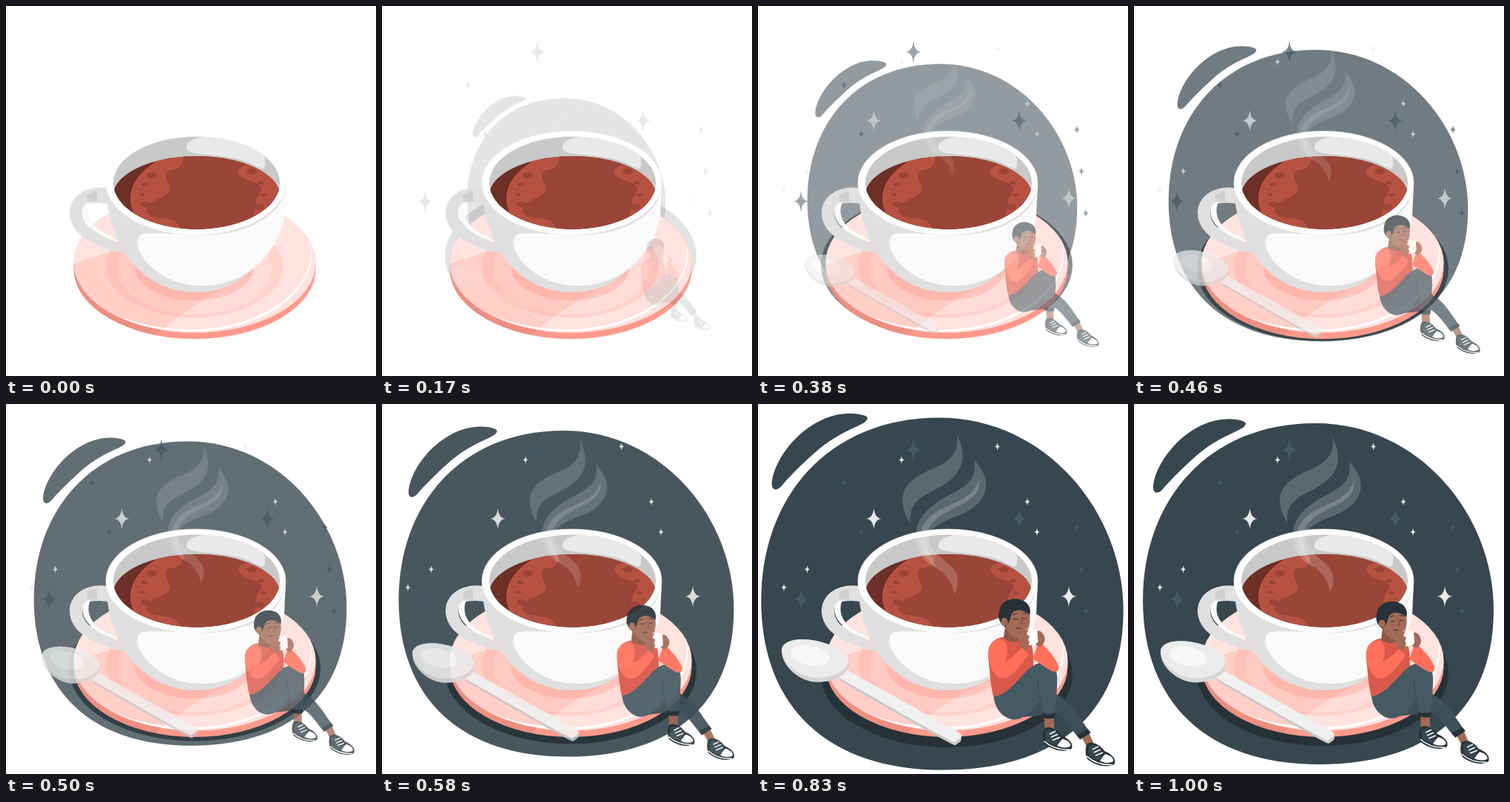
Write an HTML page that moves like this. It is 500 px wide and 500 px high and loops after 1.04 s.

```html
<!DOCTYPE html>
<html lang="en">
<head>
<meta charset="utf-8">
<title>Coffee break</title>
<style>
html, body { margin: 0; height: 100%; overflow: hidden; background: #fff; }
svg { display: block; width: 100%; height: 100%; }
</style>
</head>
<body>
<svg viewBox="0 0 500 500">
  <defs>
    <clipPath id="wedge"><path d="M80 352 148 330 250 340 335 362Q265 392 212 436L200 446V460H80Z"/></clipPath>
    <clipPath id="mouth"><ellipse cx="257.5" cy="239" rx="112.5" ry="62.5"/></clipPath>
    <clipPath id="coffee"><ellipse cx="257.5" cy="257" rx="113" ry="54"/></clipPath>
    <path id="star" d="M0-1Q.08-.08 .7 0 .08 .08 0 1-.08 .08-.7 0-.08-.08 0-1Z"/>
    <g id="shoe">
      <path fill="#263238" d="M387 437C394 432 404 438 410 446 420 450 426 457 423 463 414 469 398 465 388 457 384 450 385 442 387 437Z"/>
      <path fill="#37474f" d="M389 440C396 436 403 440 408 448L404 459Q394 457 389 452Z"/>
      <path fill="#fff" d="M411 450C419 452 423 457 421 460 414 463 408 461 404 459Q407 454 411 450Z"/>
      <path fill="none" stroke="#fff" stroke-width="1.5" d="M394 444l8-4M396 448l9-4M398 452l10-4M387 453Q400 465 420 464"/>
    </g>
  </defs>

  <g data-zoom="249 253" fill="#37474f">
    <path d="M245 26C385 26 486 150 486 278 486 420 390 487 250 487 100 487 12 405 12 265 12 130 100 26 245 26Z"/>
    <path d="M150 29C147 36 114 43 83 71 63 89 48 104 38 116 31 123 25 120 26 110 29 85 52 50 85 32 108 19 132 18 147 23Q153 25 150 29Z"/>
  </g>
  <g id="stars"></g>
  <ellipse id="shadow" cx="255" cy="364" rx="170" ry="98" fill="#263238"/>

  <!-- saucer -->
  <path fill="#ff9a8c" d="M91.5 347A163.5 94.5 0 0 1 418.5 347V355.5A163.5 94.5 0 0 1 91.5 355.5Z"/>
  <path clip-path="url(#wedge)" opacity=".07" d="M91.5 347H418.5V355.5A163.5 94.5 0 0 1 91.5 355.5Z"/>
  <ellipse cx="255" cy="347" rx="163.5" ry="94.5" fill="#ffe3df"/>
  <ellipse cx="254.5" cy="352" rx="119.5" ry="69" fill="#ffd2cc"/>
  <ellipse cx="254.5" cy="355" rx="104.5" ry="62" fill="#ffdcd7"/>
  <ellipse cx="254.5" cy="354" rx="80" ry="44" fill="#ffc4bc"/>
  <ellipse cx="255" cy="347" rx="163.5" ry="94.5" fill="#ff8878" opacity=".22" clip-path="url(#wedge)"/>
  <path fill="#fff" d="M409 315C428 375 350 439 245 437 205 436 170 428 143 415 172 430 210 440 248 440 355 441 432 375 409 315Z"/>

  <!-- cup -->
  <path fill="#e0e0e0" d="M137 246C110 242 86 256 86 280 86 306 115 325 160 334L150 319C125 310 103 298 103 280 102 268 115 264 137 267Z"/>
  <path fill="#fafafa" d="M104 272C99 292 122 310 152 319L142 311C118 302 106 284 114 265Q106 266 104 272Z"/>
  <path fill="#cfcfcf" d="M123 250Q116 251 110 254V265Q116 263 123 265Z"/>
  <path fill="#e0e0e0" d="M135 239C135 312 176 387 258 387 335 387 378 310 378 239Z"/>
  <path fill="#fafafa" d="M186 308C172 310 176 330 190 346 210 368 235 378 265 378 320 378 365 340 376 285L378 239C378 290 310 312 260 309 230 309 205 306 186 308Z"/>
  <ellipse cx="256.5" cy="239" rx="121.5" ry="70" fill="#fff" stroke="#f5f5f5" stroke-width=".5"/>
  <g clip-path="url(#mouth)">
    <path fill="#c9c9c9" d="M140 170H375V305H140Z"/>
    <path fill="#e9e9e9" d="M272 176C252 178 243 184 244 193 247 203 290 199 320 209 334 213 345 222 349 219 351 212 351 205 347 201 325 184 300 176 272 176Z"/>
    <g clip-path="url(#coffee)">
      <path fill="#6d2f26" d="M140 200H375V305H140Z"/>
      <path fill="#b75242" d="M225 200C190 212 168 236 168 260 168 275 175 288 188 302H375V200Z"/>
      <g id="pool" fill="#994538">
        <path d="M240 200C239 218 235 220 222 222 208 226 222 240 221 249 219 260 190 262 190 275 190 283 195 285 208 286 222 288 234 290 236 304H300C305 290 320 293 330 287 340 280 335 270 338 262 342 250 352 247 340 240 325 236 312 230 314 222 316 216 323 217 326 213 300 200 270 198 240 200Z"/>
      </g>
    </g>
  </g>

  <g data-zoom="252 149" fill="#fff" fill-opacity=".18">
    <path d="M268 44C272 65 262 78 240 88 215 98 192 112 198 138 199 147 203 154 207 160 207 142 210 132 232 121 262 106 290 88 268 44Z"/>
    <path d="M291 78C294 100 285 110 262 122 236 135 215 152 215 175 215 200 228 214 240 218 255 228 262 238 265 254 272 240 272 225 255 212 240 200 228 188 232 175 237 164 254 157 272 150 302 138 322 112 291 78Z"/>
    <path d="M297 103C292 125 270 132 250 141 228 151 218 168 221 185 225 205 235 212 243 222 234 205 226 190 229 173 234 157 252 147 268 139 288 130 300 120 297 103Z"/>
  </g>

  <g data-zoom="153.5 389">
    <path fill="#c9c9c9" d="M112 371 122 362 268 443Q273 447 270 454L263 459Q256 458 112 374Z"/>
    <path fill="#f0f0f0" d="M112 370 122 361 268 442Q273 446 269 450L262 455Q258 455 112 371Z"/>
    <path fill="#d6d6d6" d="M36 333C40 318 70 317 95 326 115 333 125 345 124 354 120 369 100 378 78 376 52 372 34 350 36 333Z"/>
    <path fill="#ebebeb" d="M36 332C40 318 70 317 95 326 115 333 125 343 123 351 118 364 98 372 78 370 52 367 35 347 36 332Z"/>
    <ellipse cx="73" cy="341" rx="26" ry="13" transform="rotate(12 73 341)" fill="#f7f7f7"/>
  </g>

  <g data-zoom="397 376.5">
    <path fill="#3d5059" d="M345 424C365 420 385 420 401 416 412 422 422 436 432 449L446 440C432 420 420 400 403 392L370 395Z"/>
    <path fill="#a36a55" d="M387 421H400V434Q402 442 396 444 390 442 388 440ZM436 448 446 443 453 458Q453 464 444 463Z"/>
    <use href="#shoe"/>
    <use href="#shoe" x="56" y="20"/>
    <path fill="#d9594a" d="M332 317C318 320 313 330 314 345 317 375 318 390 323 400 345 397 362 376 373 358 373 345 373 335 370 325L350 318Z"/>
    <path fill="#455a64" d="M321 395C340 393 354 370 369 357 386 344 404 349 404 370 404 390 402 405 401 421L385 420C385 410 384 402 382 398 370 418 355 428 342 424 330 420 322 408 321 395Z"/>
    <path fill="#263238" d="M384 416Q393 419 402 416L401 423Q392 425 385 422ZM430 445 444 437 448 442 434 451Z"/>
    <path fill="none" stroke="#37474f" d="M382 398Q377 387 379 374"/>
    <path fill="#8d5745" d="M336 302 353 315 354 322Q343 326 334 318Z"/>
    <path fill="#a36a55" d="M340 285C350 276 366 279 368 287 370 300 366 310 359 317 350 322 339 313 336 303Z"/>
    <path fill="#263238" d="M328 284C329 270 345 264 356 268 366 270 371 280 368 288 362 282 350 279 345 286L341 297 336 304C328 298 326 291 328 284Z"/>
    <ellipse cx="335" cy="297" rx="4.5" ry="5.5" fill="#a36a55"/>
    <path fill="none" stroke="#263238" d="M346 288l5-2M359 286l5 0M347 293q3 2 6 0M359 292q3 2 5 0M351 306q3-2 6 0"/>
    <path fill="none" stroke="#7d4a3a" d="M357 290l2 9h-4"/>
    <path fill="#ff6f59" d="M384 326C394 335 402 345 406 355 407 365 398 363 393 359 384 354 378 349 372 345L378 328ZM329 319C314 322 311 335 316 352 320 367 328 373 338 370 348 365 358 352 367 340L359 329C350 340 342 346 336 349 341 335 340 321 329 319Z"/>
    <path fill="#a36a55" d="M378 309C383 307 388 315 388 320 387 326 384 329 380 330L374 325Z"/>
    <path fill="#fff" d="M363 307Q371 304 378 308L379 323Q375 329 365 327Z"/>
    <path fill="#a36a55" d="M353 320 361 309 367 306 364 313 368 316 366 321 368 323 366 329 363 335 356 330Z"/>
  </g>
</svg>
<script>
const LOOP = 1040, LEAD = 20, START = 80;
const DARK = '#455a64', LIGHT = '#e8e8e8';
const $ = id => document.getElementById(id);

function add(parent, tag, attrs) {
  const el = document.createElementNS('http://www.w3.org/2000/svg', tag);
  for (const k in attrs) el.setAttribute(k, attrs[k]);
  parent.append(el);
}

// n stars evenly spaced from (x, y) to (x2, y2)
function starRow(fill, r, x, y, x2, y2, n = 2) {
  for (let i = 0; i < n; i++) {
    const k = i / (n - 1);
    const place = `translate(${x + (x2 - x) * k} ${y + (y2 - y) * k}) scale(${r})`;
    add($('stars'), 'use', { href: '#star', fill, transform: place });
  }
}
starRow(DARK, 14, 210, 62, 353, 155);
starRow(DARK, 14, 58, 264, 210, 62);
starRow(DARK, 6, 116, 107, 139.5, 173);
starRow(DARK, 6, 431, 167, 443, 280, 3);
starRow(LIGHT, 14.5, 156.5, 155, 420, 260);
starRow(LIGHT, 5.5, 194, 75.5, 323.5, 57.5);
starRow(LIGHT, 5.5, 364, 132, 377, 173);
starRow(LIGHT, 5.5, 35, 248, 66.5, 223.5);

// bubbles follow an arc through the foam on each side
function bubble(angle, reach, rx) {
  add($('pool'), 'ellipse', {
    cx: 258 + reach * Math.cos(angle), cy: 253 + .58 * Math.abs(reach) * Math.sin(angle),
    rx, ry: rx * .58
  });
}
for (const reach of [-74, 90]) {
  for (let i = 0; i < 5; i++) {
    const angle = .32 * i - .6;
    bubble(angle, reach, 5 + 2 * Math.cos(i * 2));
    bubble(angle + .16, reach * 1.08, 1.4);
  }
}

// cubic-bezier(.36, -.01, .5, 1.38)
const curve = (s, a, b) => 3 * s * (1 - s) ** 2 * a + 3 * s * s * (1 - s) * b + s ** 3;
function ease(x) {
  let lo = 0, hi = 1;
  for (let i = 0; i < 24; i++) {
    const mid = (lo + hi) / 2;
    if (curve(mid, .36, .5) < x) lo = mid; else hi = mid;
  }
  return curve(hi, -.01, 1.38);
}

const zooms = [...document.querySelectorAll('[data-zoom]')];

function draw(now) {
  const t = now % LOOP;
  const p = t < START ? 0 : ease(Math.min(1, (t + LEAD) / 1000));
  for (const g of zooms) {
    const [x, y] = g.dataset.zoom.split(' ');
    g.setAttribute('transform', `translate(${x} ${y}) scale(${.5 + p / 2}) translate(${-x} ${-y})`);
  }
  $('shadow').setAttribute('transform', `translate(0 ${30 * (p - 1)})`);
  for (const el of [...zooms, $('stars'), $('shadow')])
    el.setAttribute('opacity', Math.max(0, Math.min(1, p)));
}

const begin = performance.now();
function tick() {
  draw(performance.now() - begin);
  requestAnimationFrame(tick);
}
tick();
</script>
</body>
</html>
```
